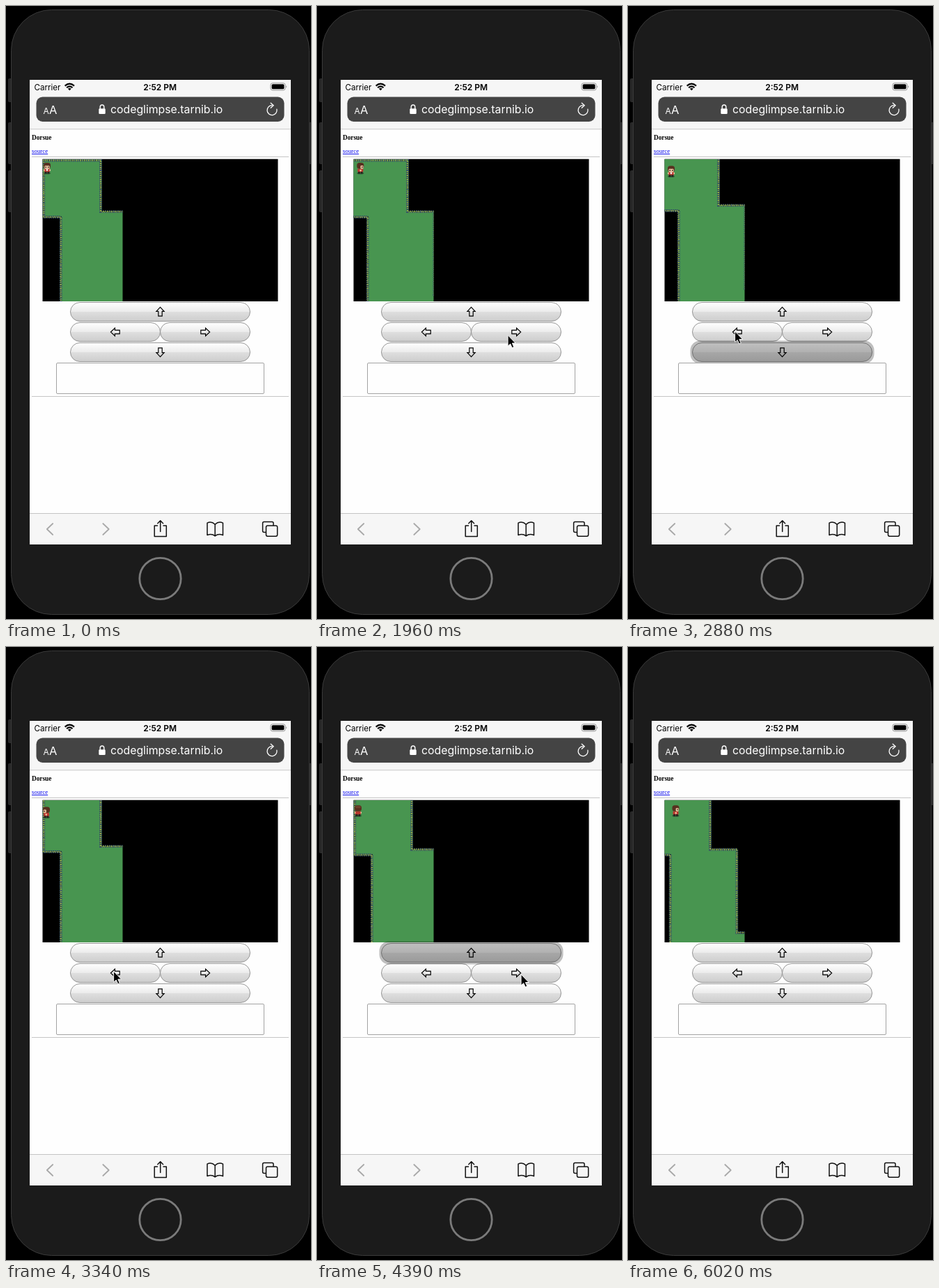
An HTML page for the animation above (6.76 s loop, 438 px wide and 880 px high).

```html
<!DOCTYPE html>
<html lang="en">
<head>
<meta charset="utf-8">
<title>Tile walk on a phone</title>
<style>
html, body { margin: 0; width: 100%; height: 100%; overflow: hidden; background: #000; }
svg { display: block; width: 100%; height: 100%; }
.ui { font-family: Inter, Roboto, sans-serif; }
.page { font-family: "Liberation Serif", "Noto Serif", serif; }
.line { fill: none; stroke: #111; stroke-width: 1.5; stroke-linecap: round; stroke-linejoin: round; }
.dim { stroke: #a9a9a9; stroke-width: 1.8; }
</style>
</head>
<body>
<svg viewBox="0 0 438 880">
  <defs>
    <linearGradient id="shine" x1="0" y1="0" x2="0" y2="1">
      <stop offset="0" stop-color="#fff"/>
      <stop offset=".48" stop-color="#ececec"/>
      <stop offset=".52" stop-color="#dedede"/>
      <stop offset="1" stop-color="#cdcdcd"/>
    </linearGradient>
    <clipPath id="view"><rect x="52.5" y="220" width="115" height="204"/></clipPath>
  </defs>

  <!-- phone -->
  <rect width="438" height="880"/>
  <g fill="#272727" stroke="#363636" stroke-width=".7">
    <rect x="3.5" y="104.5" width="6" height="33" rx="1"/>
    <rect x="3.5" y="167.5" width="6" height="59" rx="1"/>
    <rect x="3.5" y="236.5" width="6" height="59" rx="1"/>
    <rect x="433" y="167.5" width="6" height="59" rx="1"/>
  </g>
  <rect x="7.5" y="5.5" width="428" height="868" rx="58" fill="#1b1b1b" stroke="#3b3b3b"/>
  <circle cx="221.5" cy="822" r="29.7" fill="#1b1b1b" stroke="#7b7b7b" stroke-width="2.8"/>
  <rect x="34" y="106" width="375" height="667" fill="#fefefe"/>

  <!-- status and address bars -->
  <rect x="34" y="106" width="375" height="71" fill="#f6f6f6"/>
  <path d="M34 176.8H409" stroke="#bdbdbd" stroke-width=".8"/>
  <g class="ui">
    <text x="40.5" y="120.5" font-size="11.6">Carrier</text>
    <text x="221.2" y="120.5" font-size="12" font-weight="600" text-anchor="middle">2:52 PM</text>
  </g>
  <g fill="none" stroke="#000" stroke-width="2.1">
    <path d="M84.6 114.6Q91.3 108.6 98 114.6"/>
    <path d="M87.1 117.2Q91.3 113.6 95.5 117.2"/>
  </g>
  <path d="M88.9 118.7Q91.3 117 93.7 118.7L91.3 121.2Z"/>
  <rect x="380" y="110.7" width="21" height="10.2" rx="2.8" fill="none" stroke="#8e8e8e" stroke-width=".9"/>
  <rect x="381.6" y="112.3" width="17.8" height="7" rx="1.5"/>
  <path d="M402.3 114.2Q404.2 115.8 402.3 117.4Z" fill="#8e8e8e"/>

  <rect x="43.5" y="130.5" width="356" height="35.5" rx="9" fill="#444"/>
  <g class="ui" fill="#fff">
    <text x="53.5" y="154.5" font-size="12">A</text>
    <text x="62" y="154.5" font-size="16.5">A</text>
    <text x="150" y="154.2" font-size="15.8">codeglimpse.tarnib.io</text>
  </g>
  <rect x="133.3" y="147.2" width="9.4" height="7.8" rx="1.3" fill="#fff"/>
  <path d="M135.2 148V145Q135.2 142 138 142T140.8 145V148" fill="none" stroke="#fff" stroke-width="1.4"/>
  <path d="M388.9 148.2A7 7 0 1 1 382 142.6M380.2 139.2L384.1 142.7 380.2 146.2" fill="none" stroke="#fff" stroke-width="1.3" stroke-linecap="round"/>

  <!-- page -->
  <g class="page">
    <text x="37" y="192" font-size="9.3" font-weight="bold">Dorsue</text>
    <text x="37" y="211" font-size="8.9" fill="#00e" text-decoration="underline">source</text>
  </g>
  <path d="M37 216.5H406M37 560.5H406" stroke="#c6c6c6"/>
  <rect x="52.5" y="219.7" width="338" height="204.3"/>
  <g clip-path="url(#view)">
    <g id="map">
      <path d="M52.5 220H137.5V295H175.5V416H270V520H78V303H52.5Z" fill="#489550"/>
      <g id="edges" fill="none"></g>
    </g>
    <g id="hero"></g>
  </g>
  <g id="pad"></g>
  <rect x="72.5" y="512.5" width="298" height="44" rx="1.5" fill="#fefefe" stroke="#a3a3a3"/>

  <!-- bottom toolbar -->
  <rect x="34" y="728" width="375" height="45" fill="#f6f6f6"/>
  <path d="M34 728.5H409" stroke="#c4c4c4"/>
  <g class="line">
    <path class="dim" d="M67.2 743L58.8 751 67.2 759M139.3 743L147.7 751 139.3 759"/>
    <path d="M217.5 746H213.2V761.5H230.3V746H226M221.7 754.5V739M217.8 742.7L221.7 738.8 225.6 742.7"/>
    <path d="M300.2 744.3Q295 739.2 289 742.2V759.6Q295.4 757 300.2 760.8 305 757 311.5 759.6V742.2Q305.4 739.2 300.2 744.3V760.6"/>
    <path d="M373 755.6H370.6Q368.6 755.6 368.6 753.6V742.6Q368.6 740.6 370.6 740.6H382Q384 740.6 384 742.6V745.5"/>
    <rect x="373.5" y="746" width="16.2" height="15.2" rx="2.2"/>
  </g>

  <path id="cursor" d="M.6 .6V16.2L4.2 13 6.7 18.6 9.2 17.5 6.8 12H11.6Z" stroke="#fff" stroke-width=".9"/>
</svg>

<script>
const LOOP = 6760;
const STEP = 57;
const $ = id => document.getElementById(id);
const move = (el, x, y) => el.setAttribute('transform', `translate(${x} ${y})`);
const box = (x, y, w, h, fill, rx = 0) =>
  `<rect x="${x}" y="${y}" width="${w}" height="${h}" fill="${fill}" rx="${rx}"/>`;

// Grass fringe: a dark broken line with bright tufts over it
const rim = 'M54.2 303V221.5H136V295.2H174.3V414.5H270M52 303H78.7V520';
$('edges').innerHTML = [
  ['#34506a', 3.8, '1.7 1.1 2.3 .9', 0],
  ['#263f3a', 2.4, '1 2.4', 1],
  ['#a9b83f', 2.2, '1.4 1.5 .9 1.8', .5]
].map(([color, width, dash, shift]) =>
  `<path d="${rim}" stroke="${color}" stroke-width="${width}" stroke-dasharray="${dash}" stroke-dashoffset="${shift}"/>`
).join('');

// Direction pad
const buttons = {
  up: { x: 92.5, y: 425.5, w: 258, turn: 0 },
  left: { x: 92.5, y: 454.5, w: 129, turn: -90 },
  right: { x: 221.5, y: 454.5, w: 129, turn: 90 },
  down: { x: 92.5, y: 483.5, w: 258, turn: 180 }
};
const arrow = 'M0 -6.6L5.6 -.6H2.7V6.2H-2.7V-.6H-5.6Z';
$('pad').innerHTML = Object.values(buttons).map(({ x, y, w, turn }) =>
  `<rect x="${x}" y="${y}" width="${w}" height="27" rx="13.5" fill="url(#shine)" stroke="#8c8c8c" stroke-width=".9"/>
   <path d="${arrow}" transform="translate(${x + w / 2} ${y + 13.5}) rotate(${turn})" fill="none" stroke="#000" stroke-width="1.2"/>`
).join('') + Object.entries(buttons).map(([name, { x, y, w }]) =>
  `<rect id="${name}" x="${x - 3}" y="${y - 3}" width="${w + 6}" height="33" rx="14"/>`
).join('');

// Small walker seen from four sides
const hair = '#57301f', skin = '#f1c9a4', red = '#b8382f', dark = '#2b1c1c';
function walker(side) {
  const head = box(-5, -7.5, 10, 8.5, hair, 3.5);
  const body = box(-4, 1, 8, 5, red, 1) + box(-3.2, 5.4, 2.6, 2.8, dark) + box(.6, 5.4, 2.6, 2.8, dark);
  const shade = '<ellipse cy="7.5" rx="5" ry="1.6" fill="#2c5c35"/>';
  const looks = {
    down: box(-3.5, -3.2, 7, 4.6, skin, 1) + box(-2.3, -2, 1.2, 2, dark) + box(1.1, -2, 1.2, 2, dark)
      + box(-5, 2, 1.5, 2.4, skin) + box(3.5, 2, 1.5, 2.4, skin) + box(-1.2, 1.6, 2.4, 2.6, '#eee'),
    right: box(.2, -3.4, 4, 4.6, skin, 1) + box(2, -2.2, 1.2, 2, dark) + box(-.8, 2.4, 2.2, 2.4, skin),
    left: box(-4.2, -3.4, 4, 4.6, skin, 1) + box(-3.2, -2.2, 1.2, 2, dark) + box(-1.4, 2.4, 2.2, 2.4, skin),
    up: box(-3.8, -6.4, 7.6, 3, '#70402a', 1.5) + box(-5, 2, 1.4, 2.2, skin) + box(3.6, 2, 1.4, 2.2, skin)
  };
  return `<g data-side="${side}">${shade}${body}${head}${looks[side]}</g>`;
}
$('hero').innerHTML = Object.keys(buttons).map(walker).join('');

// Time, map offset, side, walker position
const walk = [
  [0, 0, 0, 'down', 59, 232.5],
  [1560, -6, 0, 'right', 62.3, 232.5],
  [2490, -6, -9, 'down', 62, 237],
  [3170, 0, -9, 'left', 58, 237],
  [3980, 0, -4.5, 'up', 59, 234.7],
  [4690, -9, -4.5, 'right', 64, 234.7],
  [5210, -18, -4.5, 'right', 68.5, 234.7]
];

// Button, start, end of the tap highlight
const taps = [
  ['right', 1850, 1900], ['down', 2780, 2935], ['left', 3460, 3560],
  ['up', 4270, 4445], ['right', 4930, 5035], ['right', 5510, 5560]
];

// Start, end, place reached by the pointer
const legs = [
  [630, 1000, 284, 478], [1180, 1330, 283, 474],
  [1850, 1960, 273.5, 472], [1960, 2190, 232, 490],
  [2560, 2880, 153, 466.5], [2940, 3110, 154, 465],
  [3560, 3740, 164, 441], [4090, 4390, 292.5, 469.5],
  [4440, 4630, 295, 470], [5450, 5620, 297, 479],
  [5800, 5970, 341, 825, p => p * p]
];
const ease = p => p * p * (3 - 2 * p);

function pointer(t) {
  let x = 359, y = 563;
  for (const [from, to, tx, ty, curve = ease] of legs) {
    if (t < from) break;
    const n = Math.round((to - from) / STEP);
    const p = Math.min(1, Math.floor((t - from) / (to - from) * n + .001) / n);
    x += (tx - x) * curve(p);
    y += (ty - y) * curve(p);
  }
  return [x, y];
}

function draw(t) {
  const [, dx, dy, side, hx, hy] = walk.findLast(step => step[0] <= t);
  move($('map'), dx, dy);
  move($('hero'), hx, hy);
  for (const el of $('hero').children)
    el.setAttribute('display', el.dataset.side === side ? 'inline' : 'none');

  for (const name in buttons) {
    const tap = taps.find(([b, from, to]) => b === name && t >= from && t < to + 50);
    $(name).setAttribute('fill-opacity', !tap ? 0 : t < tap[2] ? .25 : .09);
  }

  $('cursor').setAttribute('display', t >= 630 && t < 6020 ? 'inline' : 'none');
  move($('cursor'), ...pointer(t));
}

function tick() {
  draw(performance.now() % LOOP);
  requestAnimationFrame(tick);
}
tick();
</script>
</body>
</html>
```
